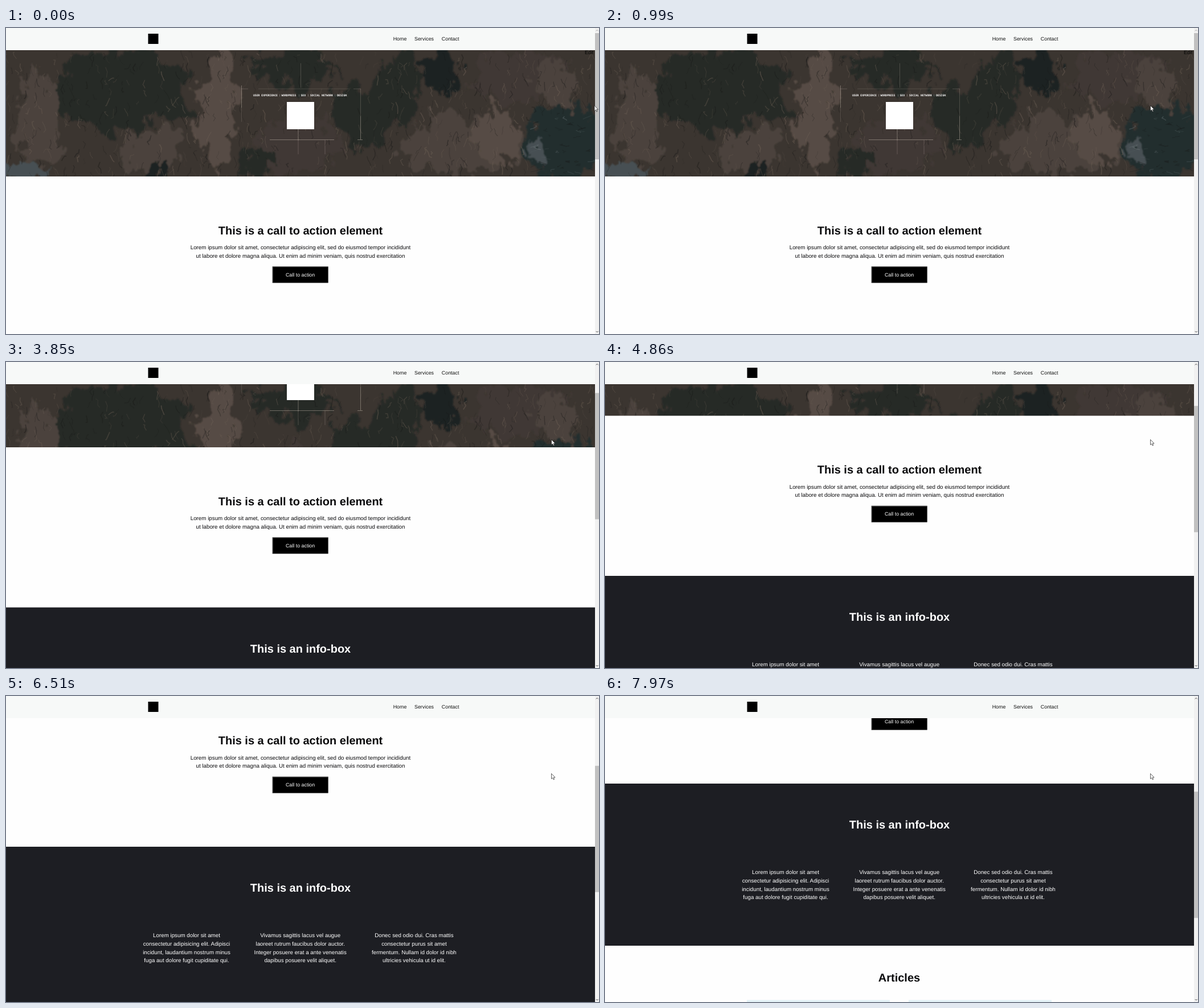
An HTML page for the animation above (8 s loop, 1041 by 538 pixels).

```html
<!DOCTYPE html>
<html lang="en">
<head>
<meta charset="utf-8">
<title>Scrolling page</title>
<style>
html, body { margin: 0; width: 100%; height: 100%; overflow: hidden; background: #fefefe; }
svg { display: block; width: 1041px; height: 538px; }
text { font-family: "Liberation Sans", Arial, sans-serif; font-size: 8.88px; text-rendering: geometricPrecision; }
.mid { text-anchor: middle; }
.big { font-size: 19.98px; font-weight: bold; }
.copy text { font-size: 9.77px; }
.tag text { font: bold 4.75px "DejaVu Sans Mono", monospace; fill: #fff; }
</style>
</head>
<body>
<svg viewBox="0 0 1041 538">
  <defs>
    <filter id="ragged" x="-5%" y="-5%" width="110%" height="110%">
      <feTurbulence type="fractalNoise" baseFrequency=".045 .03" numOctaves="4" seed="6"/>
      <feDisplacementMap in="SourceGraphic" scale="60" xChannelSelector="R" yChannelSelector="G"/>
      <feGaussianBlur stdDeviation="1.2"/>
    </filter>
    <clipPath id="photoBox"><rect y="39" width="1034" height="222"/></clipPath>
  </defs>

  <g clip-path="url(#photoBox)">
    <rect y="39" width="1034" height="222" fill="#3b3530"/>
    <g id="rocks" filter="url(#ragged)"></g>
    <g id="cracks" fill="none"></g>
  </g>

  <g id="page">
    <text x="1016" y="46" fill="#050505">Edit</text>
    <g fill="none" stroke="#d9cdbf" stroke-width=".8">
      <path opacity=".5" d="M413.5 101V140M463 196.5H576M617 196.5H626M622.5 155V196M513 178V198"/>
      <path opacity=".28" d="M517.5 62V105M413 107H425M610 107H623M622.5 107V155M560 197V222M513 198V222"/>
      <path opacity=".2" d="M443 107H602M413.5 140V165"/>
    </g>
    <g id="tags" class="tag"></g>
    <rect x="493" y="130" width="48" height="48" fill="#fff"/>

    <rect y="261" width="1034" height="900" fill="#fefefe"/>
    <g fill="#0a0a0c">
      <text class="mid big" x="517" y="362.6">This is a call to action element</text>
      <g id="intro" class="mid copy"></g>
    </g>
    <rect x="467.7" y="419.3" width="97.8" height="28.8" fill="#000"/>
    <path d="M468.2 448V419.8H565.4" fill="none" stroke="#6a6a6a"/>
    <path d="M565.2 420V447.7H468" fill="none" stroke="#333" stroke-width=".8"/>
    <text class="mid" x="516.6" y="436.5" fill="#fff">Call to action</text>

    <rect y="542.5" width="1034" height="285" fill="#1d1e23"/>
    <g fill="#fff">
      <text class="mid big" x="517" y="621.7">This is an info-box</text>
      <g id="columns" class="mid copy"></g>
    </g>
    <text class="mid big" x="516.5" y="890.2" fill="#0a0a0c">Articles</text>
    <path d="M249 923H500V1100H249ZM533 923H784V1100H533Z" fill="#e4f2f7"/>
  </g>

  <rect width="1034" height="39" fill="#f7f9f8"/>
  <rect x="249.5" y="10" width="18" height="18" fill="#000"/>
  <g fill="#111">
    <text x="679.7" y="22.2">Home</text>
    <text x="717" y="22.2">Services</text>
    <text x="764.8" y="22.2">Contact</text>
  </g>

  <rect x="1034" width="7" height="538" fill="#f1f1f1"/>
  <rect id="thumb" x="1034" width="7" height="222"/>
  <g fill="none" stroke-width="1">
    <path id="upArrow" d="M1035.7 5.3L1037.7 3.3L1039.7 5.3"/>
    <path d="M1035.7 533L1037.7 535L1039.7 533" stroke="#505050"/>
  </g>
  <path id="pointer" d="M0 0V9.3L2.1 7.4L3.6 10.7L5.1 10L3.7 6.8H6.5Z" fill="#fff" stroke="#222" stroke-width=".7"/>
</svg>

<script>
const $ = id => document.getElementById(id);
const LOOP = 8000, STEP = 55.5, THUMB_STEP = 22.75;
const scrollTimes = [2930, 3850, 4860, 5720, 6510, 7370, 7970];

function add(parent, name, attrs, text) {
  const el = document.createElementNS("http://www.w3.org/2000/svg", name);
  for (const key in attrs) el.setAttribute(key, attrs[key]);
  if (text) el.textContent = text;
  parent.appendChild(el);
  return el;
}

function lines(parent, x, y, rows) {
  rows.forEach((row, i) => add(parent, "text", { x, y: y + i * 14.65 }, row));
}

let seed = 17;
function rand() {
  seed = (seed * 16807) % 2147483647;
  return seed / 2147483647;
}

// Cliff photo: ragged patches, x, y, half width, half height, tone
const tones = { light: "#574c44", rock: "#4c433c", mid: "#413934", dark: "#282a27", cave: "#1f2120", sea: "#242d2f", foam: "#465052" };
const patches = [
  [210, 105, 130, 75, "dark"], [60, 160, 42, 90, "rock"], [255, 215, 60, 45, "rock"],
  [372, 140, 34, 110, "light"], [500, 70, 75, 38, "dark"], [515, 200, 80, 60, "mid"],
  [630, 150, 60, 60, "dark"], [800, 205, 120, 60, "rock"], [690, 100, 42, 58, "dark"],
  [765, 72, 36, 40, "cave"], [900, 90, 90, 50, "mid"], [965, 95, 42, 45, "rock"],
  [860, 190, 40, 55, "light"], [985, 208, 70, 72, "sea"], [930, 215, 9, 26, "foam"],
  [30, 254, 55, 14, "foam"], [265, 250, 14, 18, "cave"], [440, 235, 28, 30, "dark"]
];

function drawPhoto() {
  for (const [x, y, rx, ry, tone] of patches) {
    const pts = [];
    for (let i = 0; i < 22; i++) {
      const a = i / 22 * Math.PI * 2, k = 0.72 + rand() * 0.45;
      pts.push((x + Math.cos(a) * rx * k).toFixed(1) + "," + (y + Math.sin(a) * ry * k).toFixed(1));
    }
    add($("rocks"), "polygon", { points: pts.join(" "), fill: tones[tone] });
  }
  for (let i = 0; i < 700; i++) {
    const x = rand() * 1034, y = 39 + rand() * 222;
    const wet = x > 925 && y > 140;
    const jag = () => `l${((rand() - 0.5) * (wet ? 16 : 9)).toFixed(1)} ${(rand() * (wet ? 3 : 9)).toFixed(1)}`;
    add($("cracks"), "path", {
      d: `M${x.toFixed(1)} ${y.toFixed(1)}` + jag() + jag() + jag(),
      stroke: rand() < 0.6 ? "#171716" : wet ? "#6b7679" : "#75675b",
      "stroke-width": (0.6 + rand() * 1.2).toFixed(1),
      opacity: (0.12 + rand() * 0.3).toFixed(2)
    });
  }
}

function drawText() {
  [[434, "USER EXPERIENCE"], [483.5, "WORDPRESS"], [517.5, "SEO"], [534, "SOCIAL NETWORK"], [581, "DESIGN"]]
    .forEach(([x, word]) => add($("tags"), "text", { x, y: 120.4 }, word));
  [480, 514, 530, 577.5].forEach(x =>
    add($("tags"), "rect", { x, y: 116.5, width: 0.6, height: 4, fill: "#fff", opacity: 0.5 }));
  lines($("intro"), 517, 389.1, [
    "Lorem ipsum dolor sit amet, consectetur adipiscing elit, sed do eiusmod tempor incididunt",
    "ut labore et dolore magna aliqua. Ut enim ad minim veniam, quis nostrud exercitation"
  ]);
  const cols = $("columns");
  lines(cols, 317, 701.7, ["Lorem ipsum dolor sit amet", "consectetur adipisicing elit. Adipisci",
    "incidunt, laudantium nostrum minus", "fuga aut dolore fugit cupiditate qui."]);
  lines(cols, 516.7, 701.7, ["Vivamus sagittis lacus vel augue", "laoreet rutrum faucibus dolor auctor.",
    "Integer posuere erat a ante venenatis", "dapibus posuere velit aliquet."]);
  lines(cols, 716.4, 701.7, ["Donec sed odio dui. Cras mattis", "consectetur purus sit amet",
    "fermentum. Nullam id dolor id nibh", "ultricies vehicula ut id elit."]);
}

// Share of a move done in n equal jumps, the first at start, the last at end
function jumps(t, start, end, n) {
  if (t < start) return 0;
  return Math.min(n, Math.floor((t - start) / (end - start) * (n - 1) + 1e-6) + 1) / n;
}

function render(t) {
  const count = scrollTimes.filter(at => t >= at).length;
  $("page").setAttribute("transform", `translate(0 ${-count * STEP})`);
  $("thumb").setAttribute("y", 9 + count * THUMB_STEP);
  $("thumb").setAttribute("fill", t >= 120 && t < 662 ? "#a8a8a8" : "#c1c1c1");
  $("upArrow").setAttribute("stroke", count ? "#505050" : "#a3a3a3");
  const out = jumps(t, 580, 990, 6);
  const x = 1033 + 1.5 * jumps(t, 120, 380, 4) - 77 * (1 - (1 - out) ** 2);
  $("pointer").setAttribute("transform", `translate(${x.toFixed(2)} 136.4)`);
}

drawPhoto();
drawText();
const begin = performance.now();
function tick() {
  render((performance.now() - begin) % LOOP);
  requestAnimationFrame(tick);
}
tick();
</script>
</body>
</html>
```
